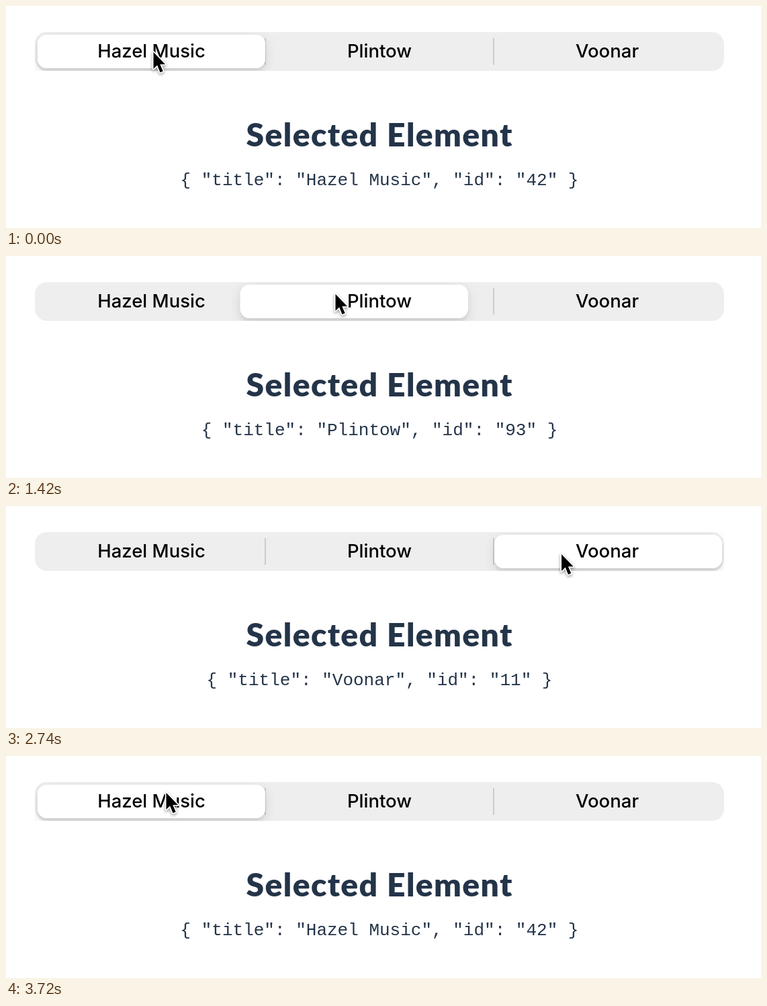
An HTML page with a canvas that plays this animation: 1124x332 px, repeating every 4060 ms.

```html
<!DOCTYPE html>
<html lang="en">
<head>
<meta charset="utf-8">
<title>Segmented control</title>
<style>
  html, body { margin: 0; width: 100%; height: 100%; overflow: hidden; background: #fff; }
  canvas { display: block; width: 1124px; height: 332px; }
</style>
</head>
<body>
<canvas id="stage"></canvas>
<script>
const W = 1124, H = 332, LOOP = 4060;
const canvas = document.getElementById('stage');
const ratio = window.devicePixelRatio || 1;
canvas.width = W * ratio;
canvas.height = H * ratio;
const ctx = canvas.getContext('2d');

const options = [
  { title: 'Hazel Music', id: '42', x: 216.5 },
  { title: 'Plintow', id: '93', x: 556 },
  { title: 'Voonar', id: '11', x: 895 }
];
const bar = { x: 43, y: 39, w: 1026, h: 58 };
const PILL_X = 47, STEP = 340, SLIDE = 300, FADE = 200;

// Pointer travel: start, end, from, to
const moves = [
  { t0: 500, t1: 1040, from: [218, 67], to: [489, 55] },
  { t0: 1620, t1: 2140, from: [489, 55], to: [888, 72] },
  { t0: 2686, t1: 3220, from: [888, 72], to: [237, 53] }
];
const clicks = [{ t: 1240, to: 1 }, { t: 2320, to: 2 }, { t: 3400, to: 0 }];
const hovers = [
  { option: 1, t0: 781, t1: 1240 },
  { option: 2, t0: 1878, t1: 2320 },
  { option: 1, t0: 2812, t1: 3028 },
  { option: 0, t0: 3028, t1: 3400 }
];

const arrow = new Path2D('M0 0V25L5.6 19.6L10 30.2L14.2 28.4L9.8 18.2H17.6Z');
const hand = new Path2D(
  'M5.4 4.4C4.6 1 9.4 .2 10.4 3.6L12.8 11.2C14 8.6 17.8 9 18.4 11.6' +
  'C19.6 9.8 22.8 10.4 23.4 13C25 11.6 28.4 12.6 28.4 15.8' +
  'C28.8 20.4 28.2 23.4 26.4 27L25.6 32H13C12 28.4 7.4 25 3 19.2' +
  'C.6 16.2 2 13.6 4.6 14C6.6 14.4 7.6 16 9 17.6Z');
const creases = new Path2D('M14.6 17.5V26.5M18.6 17.5V26.5M22.6 17.5V26.5');

const clamp = v => Math.min(1, Math.max(0, v));
const lerp = (a, b, k) => a + (b - a) * k;
const travel = p => p * (0.8 + p * (1.4 - 1.2 * p));

// CSS "ease": cubic-bezier(.25, .1, .25, 1)
function ease(x) {
  if (x <= 0 || x >= 1) return clamp(x);
  let lo = 0, hi = 1, u = x;
  for (let i = 0; i < 20; i++) {
    u = (lo + hi) / 2;
    const bx = 0.75 * u * (1 - u) + u * u * u;
    if (bx < x) lo = u; else hi = u;
  }
  return 0.3 * u * (1 - u) * (1 - u) + 3 * u * u * (1 - u) + u * u * u;
}

function pointer(t) {
  let pos = moves[0].from;
  for (const m of moves) {
    if (t < m.t0) break;
    const k = travel(clamp((t - m.t0) / (m.t1 - m.t0)));
    pos = m.from.map((v, i) => lerp(v, m.to[i], k));
  }
  return pos;
}

function selection(t) {
  let index = 0, x = PILL_X;
  for (const c of clicks) {
    if (t < c.t) break;
    x = lerp(PILL_X + index * STEP, PILL_X + c.to * STEP, ease((t - c.t) / SLIDE));
    index = c.to;
  }
  return { index, x };
}

function labelAlpha(option, t) {
  let dim = 0;
  for (const h of hovers) {
    if (h.option === option) dim += ease((t - h.t0) / FADE) - ease((t - h.t1) / FADE);
  }
  return 1 - 0.78 * dim;
}

function shadow(color, blur, y) {
  ctx.shadowColor = color;
  ctx.shadowBlur = blur * ratio;
  ctx.shadowOffsetY = y * ratio;
}

function box(x, y, w, h, r) {
  ctx.beginPath();
  ctx.roundRect(x, y, w, h, r);
  ctx.fill();
}

function text(str, x, y, font, color, spacing = 0) {
  ctx.font = font;
  ctx.letterSpacing = spacing + 'px';
  ctx.fillStyle = color;
  ctx.fillText(str, x + spacing / 2, y);
}

function drawControl(t, pillX) {
  ctx.fillStyle = '#eeeeee';
  box(bar.x, bar.y, bar.w, bar.h, 18);
  ctx.fillStyle = '#cccccc';
  for (const x of [385, 725]) ctx.fillRect(x, 48, 2, 40);

  ctx.save();
  ctx.beginPath();
  ctx.rect(bar.x, bar.y, bar.w, bar.h);
  ctx.clip();
  ctx.fillStyle = '#fff';
  shadow('rgba(0,0,0,.12)', 18, 6);
  box(pillX, 43, 339, 50, 14);
  shadow('rgba(0,0,0,.04)', 2, 6);
  box(pillX, 43, 339, 50, 14);
  ctx.restore();

  options.forEach((o, i) => {
    ctx.globalAlpha = labelAlpha(i, t);
    text(o.title, o.x, 77, '500 27.5px Inter, sans-serif', '#000');
  });
  ctx.globalAlpha = 1;
}

function drawPointer(t) {
  const [x, y] = pointer(t);
  const overOption = hovers.some(h => t >= h.t0 && t < h.t1);
  ctx.save();
  ctx.lineJoin = ctx.lineCap = 'round';
  if (overOption) {
    ctx.translate(x - 8.5, y + 2);
    ctx.lineWidth = 2;
    ctx.strokeStyle = '#000';
    ctx.fillStyle = '#fff';
    ctx.save();
    shadow('rgba(0,0,0,.35)', 4, 2);
    ctx.fill(hand);
    ctx.restore();
    ctx.stroke(hand);
    ctx.lineWidth = 1.8;
    ctx.stroke(creases);
  } else {
    ctx.translate(x + 1.5, y + 2);
    ctx.lineWidth = 3.4;
    ctx.strokeStyle = '#fff';
    ctx.save();
    shadow('rgba(0,0,0,.4)', 4, 2);
    ctx.stroke(arrow);
    ctx.restore();
    ctx.fillStyle = '#000';
    ctx.fill(arrow);
  }
  ctx.restore();
}

function draw(t) {
  ctx.setTransform(ratio, 0, 0, ratio, 0, 0);
  ctx.fillStyle = '#fff';
  ctx.fillRect(0, 0, W, H);
  ctx.textAlign = 'center';
  const { index, x } = selection(t);
  const { title, id } = options[index];
  drawControl(t, x);
  text('Selected Element', 555.5, 209.5, '900 48px Lato, sans-serif', '#243449', 1.4);
  text(`{ "title": "${title}", "id": "${id}" }`, 556, 267.5,
    '26px "Liberation Mono", monospace', '#243449');
  drawPointer(t);
}

const start = performance.now();
function tick() {
  draw((performance.now() - start) % LOOP);
  requestAnimationFrame(tick);
}
tick();
</script>
</body>
</html>
```
